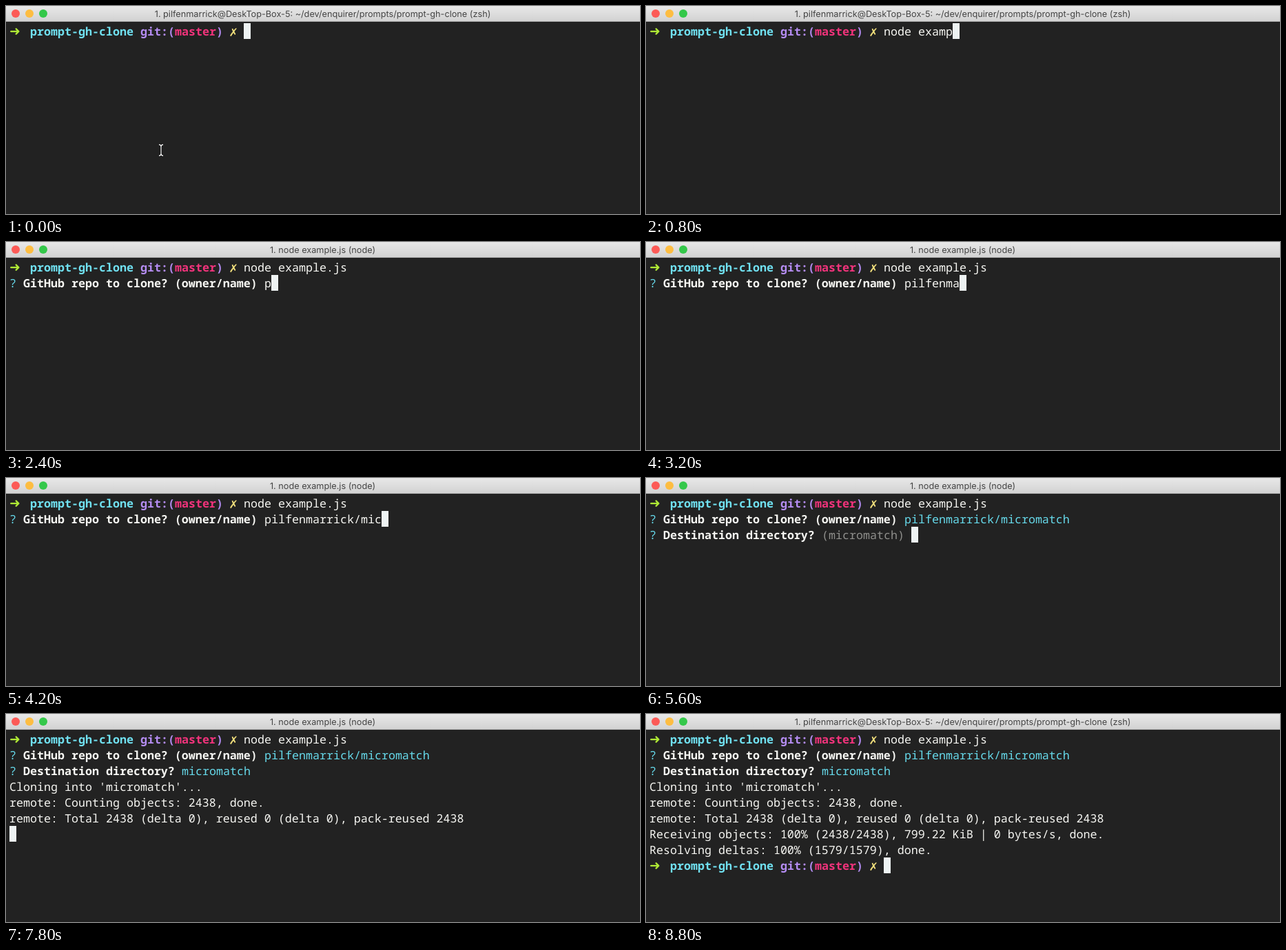
An HTML page with a canvas that plays this animation: 920x303 px, repeating every 9 s.

```html
<!DOCTYPE html>
<html lang="en">
<head>
<meta charset="utf-8">
<title>Terminal prompt</title>
<style>
  html, body { margin: 0; width: 100%; height: 100%; overflow: hidden; background: #222; }
  canvas { display: block; }
</style>
</head>
<body>
<canvas id="stage" width="920" height="303"></canvas>
<script>
const ctx = document.getElementById('stage').getContext('2d');
const LOOP = 9000, STEP = 200;
const CELL = 10, ROW = 23, LEFT = 5, TOP = 25;
const MONO = '"Noto Sans Mono", "DejaVu Sans Mono", monospace';
const COLOR = {
  bg: '#222222', text: '#f6f6f2', cursor: '#eef3f3', cyan: '#66d9ea', dim: '#8f8f8c',
  dir: '#70e0f0', git: '#b48cf2', branch: '#f0337b', arrow: '#b0ea35', dirty: '#f3e07c'
};

const OWNER = 'pilfenmarrick';
const REPO = OWNER + '/micromatch';
const COMMAND = 'node example.js';
const SHELL_TITLE = `1. ${OWNER}@DeskTop-Box-5: ~/dev/enquirer/prompts/prompt-gh-clone (zsh)`;
const OUTPUT = [
  [6600, "Cloning into 'micromatch'..."],
  [7600, 'remote: Counting objects: 2438, done.'],
  [7800, 'remote: Total 2438 (delta 0), reused 0 (delta 0), pack-reused 2438'],
  [8000, 'Receiving objects: 100% (2438/2438), 799.22 KiB | 0 bytes/s, done.'],
  [8200, 'Resolving deltas: 100% (1579/1579), done.']
];

const typed = (text, count) => text.slice(0, Math.max(0, Math.round(count)));

function write(text, col, row, color, weight = 400) {
  ctx.font = `${weight} 16.667px ${MONO}`;
  ctx.textAlign = 'left';
  ctx.fillStyle = color;
  ctx.fillText(text, LEFT + col * CELL, TOP + row * ROW + 18);
  return col + text.length;
}

function cursor(col, row) {
  ctx.fillStyle = COLOR.cursor;
  ctx.fillRect(LEFT + col * CELL, TOP + row * ROW, CELL, ROW);
}

// Centres a symbol by its ink box.
function symbol(char, x, y, size, color) {
  ctx.font = `${size}px "DejaVu Sans", sans-serif`;
  ctx.textAlign = 'left';
  ctx.fillStyle = color;
  const box = ctx.measureText(char);
  ctx.fillText(char,
    x + (box.actualBoundingBoxLeft - box.actualBoundingBoxRight) / 2,
    y + (box.actualBoundingBoxAscent - box.actualBoundingBoxDescent) / 2);
}

function shellPrompt(row) {
  const y = TOP + row * ROW + 12;
  symbol('➜', 13, y, 19, COLOR.arrow);
  write('prompt-gh-clone', 3, row, COLOR.dir, 600);
  write('git:(', 19, row, COLOR.git, 600);
  write('master', 24, row, COLOR.branch, 600);
  write(')', 30, row, COLOR.git, 600);
  symbol('✗', 330, y + 1, 16, COLOR.dirty);
  return 34;
}

function question(text, row) {
  write('?', 0, row, COLOR.cyan);
  return write(text, 2, row, COLOR.text, 600) + 1;
}

function titleBar(title) {
  const shade = ctx.createLinearGradient(0, 0, 0, 22);
  shade.addColorStop(0, '#e8e8e8');
  shade.addColorStop(1, '#d2d2d2');
  ctx.fillStyle = shade;
  ctx.fillRect(0, 0, 920, 22);
  ctx.fillStyle = '#aaaaaa';
  ctx.fillRect(0, 22, 920, 1);
  ['#fc5b57', '#fdbd41', '#34c84a'].forEach((color, i) => {
    ctx.fillStyle = color;
    ctx.beginPath();
    ctx.arc(14 + i * 20, 11, 6, 0, Math.PI * 2);
    ctx.fill();
  });
  ctx.font = '12.7px Inter, Roboto, sans-serif';
  ctx.textAlign = 'center';
  ctx.fillStyle = '#444444';
  ctx.fillText(title, 459.5, 16);
}

function pointer(x, y) {
  ctx.beginPath();
  for (const s of [-1, 1]) {
    ctx.moveTo(x - 3, y + s * 8);
    ctx.quadraticCurveTo(x, y + s * 8, x, y + s * 5);
    ctx.quadraticCurveTo(x, y + s * 8, x + 3, y + s * 8);
  }
  ctx.moveTo(x, y - 6);
  ctx.lineTo(x, y + 6);
  for (const [width, color] of [[3, '#111111'], [1.3, '#f2f2f2']]) {
    ctx.lineWidth = width;
    ctx.strokeStyle = color;
    ctx.stroke();
  }
}

function titleAt(t) {
  if (t < 1400 || t >= 8400) return SHELL_TITLE;
  return `1. ${COMMAND} (${t < 1600 ? 'zsh' : 'node'})`;
}

function terminal(t) {
  const step = t / STEP;
  let col = write(typed(COMMAND, 3 * step - 2), shellPrompt(0), 0, COLOR.text);
  if (t < 1400) return cursor(col, 0);

  const cloneAnswered = t >= 5200;
  col = question('GitHub repo to clone? (owner/name)', 1);
  col = write(typed(REPO, 1.8 * (step - 16) + 8), col, 1, cloneAnswered ? COLOR.cyan : COLOR.text);
  if (!cloneAnswered) return cursor(col, 1);

  col = question('Destination directory?', 2);
  if (t < 6400) return cursor(write('(micromatch)', col, 2, COLOR.dim) + 1, 2);
  write('micromatch', col, 2, COLOR.cyan);

  const lines = OUTPUT.filter(([start]) => t >= start);
  lines.forEach(([, text], i) => write(text, 0, 3 + i, COLOR.text));
  const row = 3 + lines.length;
  cursor(t >= 8400 ? shellPrompt(row) : 0, row);
}

function draw(now) {
  const t = Math.floor((now % LOOP) / STEP) * STEP;
  ctx.textRendering = 'geometricPrecision';
  ctx.fillStyle = COLOR.bg;
  ctx.fillRect(0, 0, 920, 303);
  titleBar(titleAt(t));
  terminal(t);
  if (t < 200) pointer(225, 210);
}

let start;
function tick(now) {
  start ??= now;
  draw(now - start);
  requestAnimationFrame(tick);
}
draw(0);
requestAnimationFrame(tick);
</script>
</body>
</html>
```
